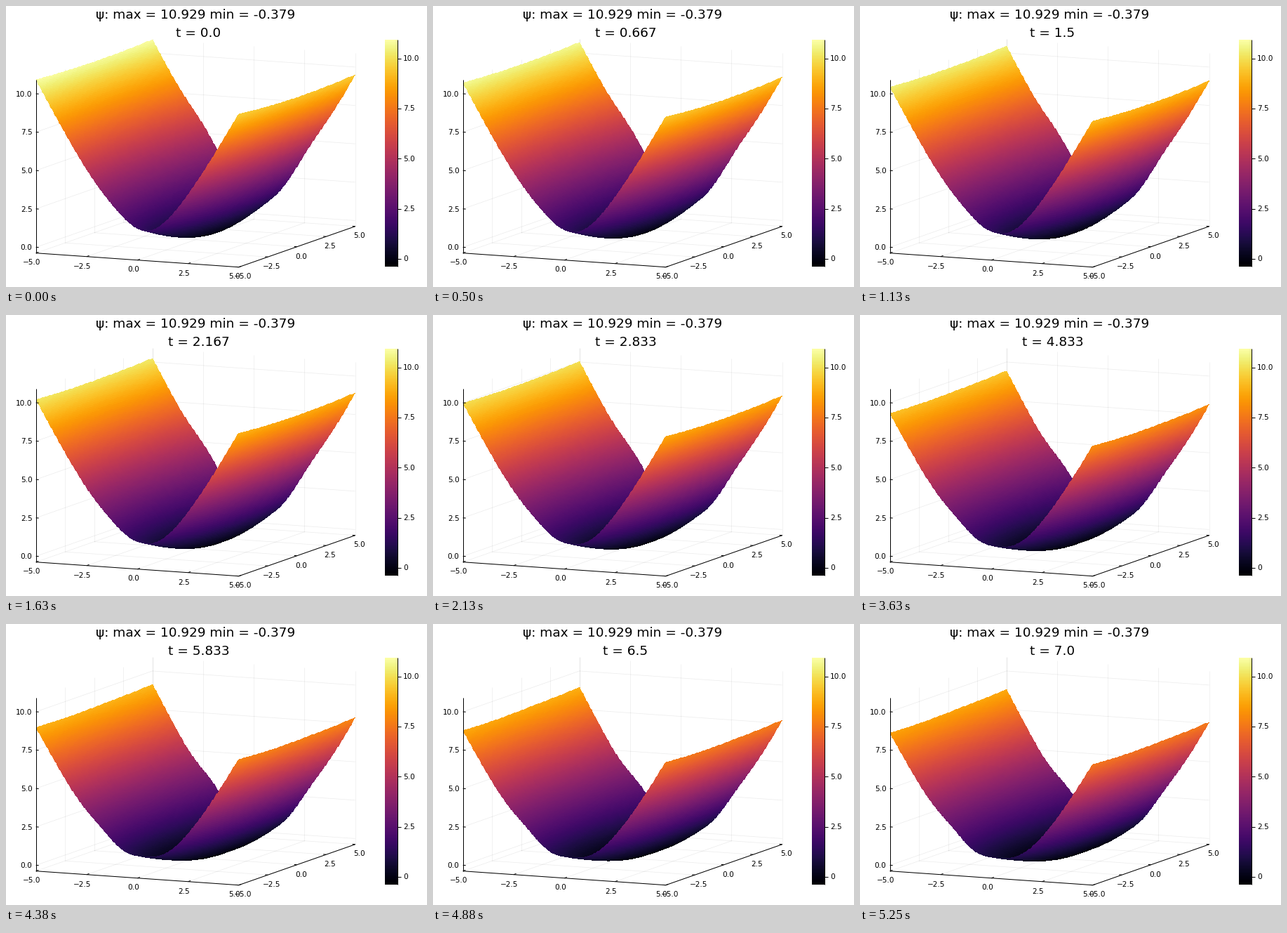
Write a matplotlib script that moves like this. It is 600 px wide and 400 px high and loops after 5.37 s.

```python
import numpy as np
import matplotlib.pyplot as plt
from matplotlib.animation import FuncAnimation

W, H, DPI = 600, 400, 100
FRAMES, LOOP_MS = 43, 5370
T_END = 7.0
Z_MIN, Z_MAX = -0.379, 10.929
PX = 72 / DPI  # points per pixel
TICK_FONT, TITLE_FONT = 10.5 * PX, 18.45 * PX

plt.rcParams["font.family"] = "DejaVu Sans"
fig = plt.figure(figsize=(W / DPI, H / DPI), dpi=DPI, facecolor="white")
ax = fig.add_axes([0, 0, 1, 1])
ax.axis("off")


def project(x, y, z):
    """Orthographic view: data coordinates to stage pixels."""
    u, v = (x + 5) / 10, (y + 5) / 10
    return 42.7 + 289 * u + 166 * v, 351.7 + 20 * u - 58 * v - 21.85 * (z - Z_MIN)


def shrink(u, r):
    """Distance u pulled towards zero by about r, flat near the centre."""
    return u * u / (u + r + 1e-9)


def bump(x, centre, width):
    return np.exp(-(((x - centre) / width) ** 2))


def psi(x, y, t):
    """Valley-shaped level set whose zero contour spreads with time."""
    s = t / T_END

    def mix(a, b):
        return a + (b - a) * s

    ex = shrink(np.abs(x - mix(0.283, 0.25)), 1.05 * s**1.12)
    ey = shrink(np.abs(y - mix(0.8, 1.2)), s)
    slope = 2.495 * (1 + mix(0.00125, 0.0042) * (y + 5))
    z = np.sqrt((slope * ex) ** 2 + mix(0.36, 0.315) * ey**2 + mix(7.85, 6.86)) - 3
    z = z + 0.0014 * (25 - y**2) * ex
    left = mix(-1.6, -1.85) - mix(0.14, 0) * y
    z = z + (mix(0.43, 0.525) + 0.03 * y) * bump(x, left, mix(1.2, 0.9))
    z = z + 0.035 * (y + 5) * bump(x, 2.7, 1.1)
    return np.clip(z, Z_MIN, Z_MAX)


def segment(p, q, color="black", width=1.0, alpha=1.0, zorder=3):
    ax.plot([p[0], q[0]], [p[1], q[1]], color=color, lw=width * PX, alpha=alpha,
            zorder=zorder, solid_capstyle="butt")


def label(x, y, value, ha="center"):
    text = f"{value}".replace("-", "\u2212")
    ax.text(x, y + 3.8, text, ha=ha, va="baseline", fontsize=TICK_FONT, zorder=4)


def grid(p, q):
    segment(project(*p), project(*q), width=0.8, alpha=0.07, zorder=1)


def draw_box():
    for v in (-5.0, -2.5, 0.0, 2.5, 5.0):
        grid((v, -5, Z_MIN), (v, 5, Z_MIN))
        grid((v, 5, Z_MIN), (v, 5, Z_MAX))
        grid((-5, v, Z_MIN), (5, v, Z_MIN))
        grid((-5, v, Z_MIN), (-5, v, Z_MAX))

        px, py = project(v, -5, Z_MIN)
        segment((px, py), (px + 3.6, py - 1.3))
        label(px - 6, py + 13, v)

        px, py = project(5, v, Z_MIN)
        segment((px, py), (px - 4, py - 0.3))
        label(px + 5.5, py + 13, v)

    for v in (0.0, 2.5, 5.0, 7.5, 10.0):
        grid((-5, -5, v), (-5, 5, v))
        grid((-5, 5, v), (5, 5, v))
        px, py = project(-5, -5, v)
        segment((px, py), (px + 4, py + 0.3))
        label(37.5, py, v, ha="right")

    corner = project(-5, -5, Z_MIN)
    near = project(5, -5, Z_MIN)
    segment(corner, project(-5, -5, Z_MAX))
    segment(corner, near)
    segment(near, project(5, 5, Z_MIN))


def draw_colorbar():
    left, right, top, bottom = 540, 558, 48, 371
    ramp = np.linspace(0, 1, 256)[:, None]
    ax.imshow(ramp, cmap="inferno", extent=(left, right, bottom, top),
              origin="lower", aspect="auto", zorder=2)
    segment((right - 0.5, top), (right - 0.5, bottom))
    for v in (0, 2.5, 5.0, 7.5, 10.0):
        y = bottom - (v - Z_MIN) / (Z_MAX - Z_MIN) * (bottom - top)
        segment((right, y), (right + 5, y))
        label(566, y - 0.5, v, ha="left")


draw_box()
draw_colorbar()
ax.text(270.5, 18, "\u03c8: max = 10.929 min = -0.379", ha="center",
        va="baseline", fontsize=TITLE_FONT)
clock = ax.text(274.5, 44.5, "", ha="center", va="baseline", fontsize=TITLE_FONT)

# Rows and columns run from far to near, so nearer cells cover farther ones.
xs, ys = np.meshgrid(np.linspace(-5, 5, 241), np.linspace(5, -5, 81))
xm = (xs[1:, 1:] + xs[:-1, :-1]) / 2
ym = (ys[1:, 1:] + ys[:-1, :-1]) / 2
surface = None


def update(i):
    global surface
    t = T_END * i / (FRAMES - 1)
    if surface is not None:
        surface.remove()
    px, py = project(xs, ys, psi(xs, ys, t))
    surface = ax.pcolormesh(px, py, psi(xm, ym, t), cmap="inferno",
                            vmin=Z_MIN, vmax=Z_MAX, shading="flat", zorder=2)
    ax.set(xlim=(0, W), ylim=(H, 0))
    clock.set_text(f"t = {round(t, 3)}")
    return surface, clock


anim = FuncAnimation(fig, update, frames=FRAMES, interval=LOOP_MS / FRAMES,
                     repeat=True, repeat_delay=0, blit=False)
plt.show()
```
